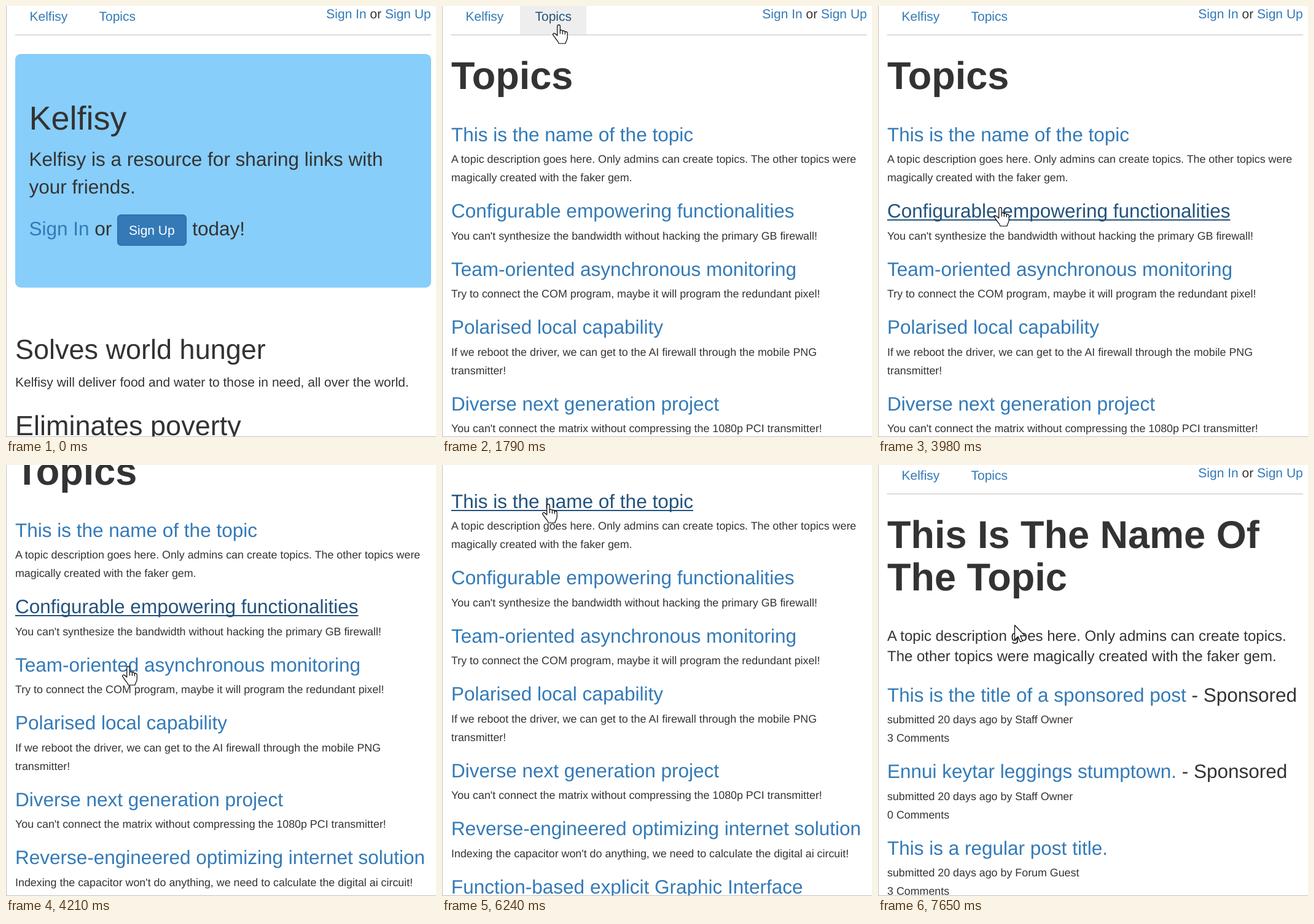
Write an HTML page with a canvas that moves like this. It is 700 px wide and 701 px high and loops after 8 s.

```html
<!DOCTYPE html>
<html lang="en">
<head>
<meta charset="utf-8">
<title>Topics walkthrough</title>
<style>
  html, body { margin: 0; width: 100%; height: 100%; overflow: hidden; background: #fff; }
  canvas { display: block; }
</style>
</head>
<body>
<canvas id="stage" width="700" height="701"></canvas>
<script>
const LOOP = 8000, W = 700, H = 701;
const INK = '#333', LINK = '#337ab7', HOVER = '#23527c', RULE = '#ddd';
const HEAD = 31.5, BODY = 21, SMALL = 17.85, LEFT = 15;
const ctx = document.getElementById('stage').getContext('2d');
ctx.textRendering = 'geometricPrecision';

const fontOf = (size, bold) => `${bold ? 'bold ' : ''}${size}px "Liberation Sans", Arial, sans-serif`;

// A page is a list of text runs; add() returns the x where the run ends.
function makePage() {
  const runs = [];
  const add = (text, x, y, size, opts = {}) => {
    const font = fontOf(size, opts.bold);
    ctx.font = font;
    const width = ctx.measureText(text).width;
    runs.push({ text, x, y, size, font, width, ...opts });
    return x + width;
  };
  return { runs, add };
}

function addNav(page) {
  page.add('Kelfisy', 38.5, 24, BODY, { link: true });
  page.add('Topics', 151.5, 24, BODY, { link: true, tab: true });
  let x = page.add('Sign In', 521.3, 20, BODY, { link: true });
  x = page.add(' or ', x, 20, BODY);
  page.add('Sign Up', x, 20, BODY, { link: true });
}

function homePage() {
  const page = makePage(), x0 = 37.5;
  addNav(page);
  page.add('Kelfisy', x0, 201, 54);
  page.add('Kelfisy is a resource for sharing links with', x0, 260, HEAD);
  page.add('your friends.', x0, 305, HEAD);
  const x = page.add('Sign In', x0, 373, HEAD, { link: true });
  page.add(' or ', x, 373, HEAD);
  page.add('Sign Up', 200, 372, BODY, { color: '#fff' });
  page.add('today!', 303.3, 373, HEAD);
  page.add('Solves world hunger', LEFT, 574, 45);
  page.add('Kelfisy will deliver food and water to those in need, all over the world.', LEFT, 619, BODY);
  page.add('Eliminates poverty', LEFT, 698, 45);
  page.hero = true;
  return page;
}

const TOPICS = [
  ['This is the name of the topic',
    'A topic description goes here. Only admins can create topics. The other topics were',
    'magically created with the faker gem.'],
  ['Configurable empowering functionalities',
    "You can't synthesize the bandwidth without hacking the primary GB firewall!"],
  ['Team-oriented asynchronous monitoring',
    'Try to connect the COM program, maybe it will program the redundant pixel!'],
  ['Polarised local capability',
    'If we reboot the driver, we can get to the AI firewall through the mobile PNG',
    'transmitter!'],
  ['Diverse next generation project',
    "You can't connect the matrix without compressing the 1080p PCI transmitter!"],
  ['Reverse-engineered optimizing internet solution',
    "Indexing the capacitor won't do anything, we need to calculate the digital ai circuit!"],
  ['Function-based explicit Graphic Interface']
];

const POSTS = [
  ['This is the title of a sponsored post', ' - Sponsored', 'Staff Owner', 3],
  ['Ennui keytar leggings stumptown.', ' - Sponsored', 'Staff Owner', 0],
  ['This is a regular post title.', '', 'Forum Guest', 3]
];

// Adds the small lines below a heading and returns the next heading's baseline.
function addDetails(page, y, lines) {
  lines.forEach((line, i) => page.add(line, LEFT, Math.ceil(y + 35) + 30 * i, SMALL));
  return y + 64.5 + 30 * lines.length;
}

function topicsPage() {
  const page = makePage();
  addNav(page);
  page.add('Topics', LEFT, 135, 63, { bold: true });
  let y = 220;
  for (const [title, ...lines] of TOPICS) {
    page.add(title, LEFT, Math.floor(y), HEAD, { link: true, underline: true });
    y = addDetails(page, y, lines);
  }
  return page;
}

function topicPage() {
  const page = makePage();
  addNav(page);
  page.add('This Is The Name Of', LEFT, 135, 63, { bold: true });
  page.add('The Topic', LEFT, 204, 63, { bold: true });
  page.add('A topic description goes here. Only admins can create topics.', LEFT, 286, 24);
  page.add('The other topics were magically created with the faker gem.', LEFT, 319, 24);
  let y = 385;
  for (const [title, note, author, comments] of POSTS) {
    const x = page.add(title, LEFT, Math.floor(y), HEAD, { link: true, underline: true });
    page.add(note, x, Math.floor(y), HEAD);
    y = addDetails(page, y, [`submitted 20 days ago by ${author}`, `${comments} Comments`]);
  }
  return page;
}

const home = homePage(), topics = topicsPage(), topic = topicPage();

// What lies under the pointer: the tab is a box, all else is text.
function hit({ page, scroll, x, y }) {
  const py = y + scroll;
  return page.runs.find(r => r.tab
    ? x > 127 && x < 235 && py < 46
    : x >= r.x && x <= r.x + r.width && py > r.y - 0.905 * r.size && py < r.y + 0.24 * r.size);
}

const states = [{ t: 0, page: home, scroll: 0, x: 0, y: 0, cursor: null, hover: null }];
const last = () => states[states.length - 1];
const change = (t, props) => states.push({ ...last(), ...props, t });

function place(t, x, y) {
  const over = hit({ ...last(), x, y });
  const hover = over && over.link ? over : null;
  change(t, { x, y, hover, cursor: hover ? 'hand' : over ? 'beam' : 'arrow' });
}

function glide(t0, t1, steps, x, y) {
  const from = last();
  for (let i = 1; i <= steps; i++) {
    const p = i / steps, e = steps > 3 ? p * p * (3 - 2 * p) : p;
    const t = steps > 1 ? t0 + (t1 - t0) * (i - 1) / (steps - 1) : t1;
    place(t, Math.round(from.x + (x - from.x) * e), Math.round(from.y + (y - from.y) * e));
  }
}

place(380, 523, 605);
glide(459, 1170, 10, 189, 36);
place(1230, 190, 30);
change(1790, { page: topics, hover: topics.runs.find(r => r.tab) });
glide(2410, 2800, 6, 173, 197);
place(2950, 173, 199);
place(3500, 173, 200);
glide(3820, 3980, 3, 199, 327);
change(4140, { scroll: 42 });
change(4210, { scroll: 103 });
change(4290, { scroll: 150 });
change(4460, { hover: null });
place(4690, 210, 320);
glide(5010, 5160, 3, 167, 161);
place(5400, 173, 177);
glide(5550, 5630, 2, 174, 94);
glide(5860, 5950, 2, 173, 75);
glide(6090, 6240, 3, 173, 63);
change(6640, { page: topic, scroll: 0, hover: null });
glide(7100, 7650, 8, 222, 260);

function box(x, y, w, h, r, fill, stroke, line = 1.5) {
  ctx.beginPath();
  ctx.roundRect(x, y, w, h, r);
  ctx.fillStyle = fill;
  ctx.fill();
  if (stroke) {
    ctx.strokeStyle = stroke;
    ctx.lineWidth = line;
    ctx.stroke();
  }
}

function drawRun(run, hovered) {
  ctx.font = run.font;
  ctx.fillStyle = run.color || (hovered ? HOVER : run.link ? LINK : INK);
  ctx.fillText(run.text, run.x, run.y);
  if (hovered && run.underline) ctx.fillRect(run.x, run.y + 3, run.width, 2);
}

const arrowPath = new Path2D('M.5 .5V24.3L6 19.2L9.8 27.8L13.4 26.2L9.7 17.8H17.3Z');
const handPath = new Path2D(
  'M7.7 18V2.8C7.7 0 12.3 0 12.3 2.8V10.5C12.8 8.6 16.3 8.8 16.4 11.2' +
  'C17 9.6 20.2 10 20.3 12.4C21 11.1 24.2 11.6 24.2 14.2V21' +
  'C24.2 26 21.5 26.5 21 31H10C9.5 27.5 6.5 25.5 4.8 22.6L1 17.4C-.4 15 2.6 13.4 4.5 15.2Z');
const knuckles = new Path2D('M12.3 10.5V15.6M16.4 11.2V16M20.3 12.4V16.6');
const beamPath = new Path2D('M-5 -12.5H-1.5L0 -11.5L1.5 -12.5H5M0 -11.5V11.5M-5 12.5H-1.5L0 11.5L1.5 12.5H5');

function drawCursor({ cursor, x, y }) {
  if (!cursor) return;
  ctx.save();
  ctx.translate(cursor === 'hand' ? x - 10 : x, y);
  ctx.fillStyle = '#fff';
  ctx.strokeStyle = '#000';
  ctx.lineWidth = 1.2;
  ctx.lineJoin = 'round';
  if (cursor === 'beam') {
    ctx.stroke(beamPath);
  } else {
    const path = cursor === 'hand' ? handPath : arrowPath;
    ctx.fill(path);
    ctx.stroke(path);
    if (cursor === 'hand') ctx.stroke(knuckles);
  }
  ctx.restore();
}

function draw(state) {
  const { page, scroll, hover } = state;
  ctx.fillStyle = '#fff';
  ctx.fillRect(0, 0, W, H);
  ctx.save();
  ctx.translate(0, -scroll);
  if (hover && hover.tab) box(127, -15, 108, 62, [6, 6, 0, 0], '#eee');
  ctx.fillStyle = RULE;
  ctx.fillRect(LEFT, 46, 677, 2);
  if (page.hero) {
    box(LEFT, 78, 677, 380, 9, '#87cefa');
    box(181.75, 339.75, 111.5, 49.5, 5.5, LINK, '#2e6da4');
  }
  page.runs.forEach(run => drawRun(run, run === hover));
  ctx.restore();
  ctx.fillStyle = '#c0c0c0';
  ctx.fillRect(0, 0, 1, H);
  ctx.fillRect(0, 700, W, 1);
  drawCursor(state);
}

function tick() {
  const t = performance.now() % LOOP;
  draw(states.filter(s => s.t <= t).pop());
  requestAnimationFrame(tick);
}
tick();
</script>
</body>
</html>
```
